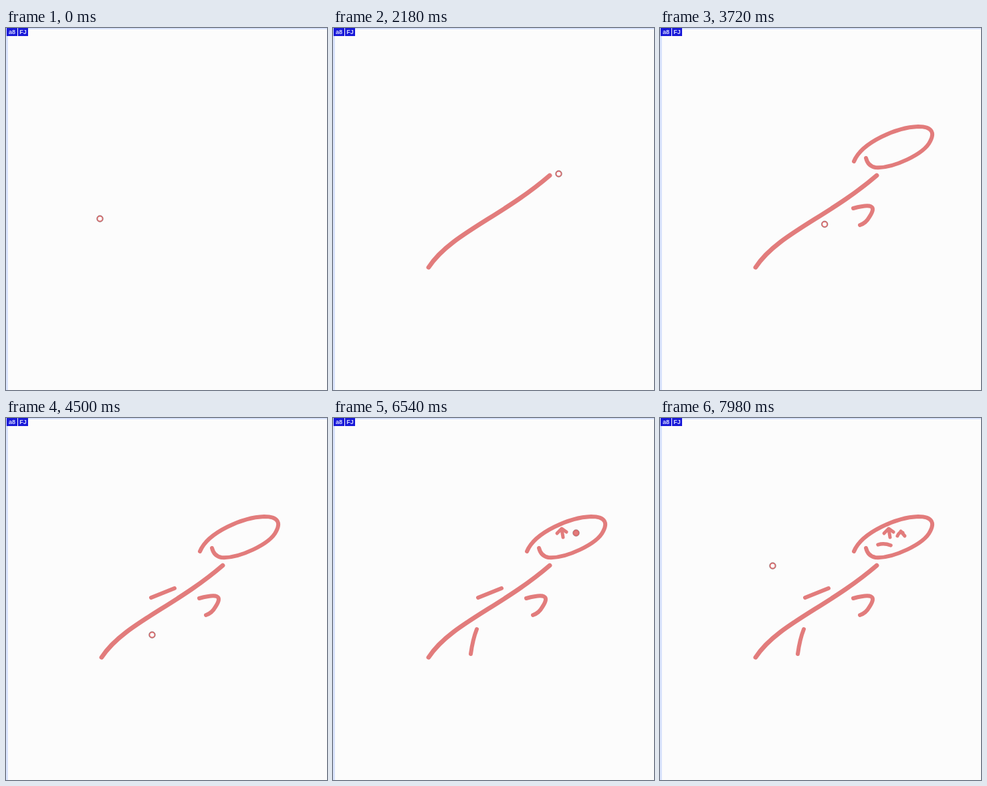
Animation, 480 px wide and 540 px high, one loop 8000 ms. Source, as an HTML page:

```html
<!DOCTYPE html>
<html lang="en">
<head>
<meta charset="utf-8">
<title>Sketching a stick figure</title>
<style>
  html, body { margin: 0; width: 100%; height: 100%; overflow: hidden; background: #fcfcfc; }
  svg { display: block; }
  .edge { fill: #d9e3fc; }
  .tab { fill: #1919d8; }
  text { font: bold 9px "Liberation Sans", Arial, sans-serif; fill: #d9ddff; text-anchor: middle; }
  #ink { fill: none; stroke: #e27c7c; stroke-linecap: round; stroke-linejoin: round; filter: blur(0.7px); }
  #pen .ring { stroke: #e06a6c; stroke-width: 1.9; }
  #pen .rim { fill: none; stroke: #5f7878; stroke-width: 0.8; stroke-opacity: 0.55; }
</style>
</head>
<body>
<svg width="480" height="540" viewBox="0 0 480 540">
  <rect class="edge" width="480" height="2"/>
  <rect class="edge" width="3" height="540"/>
  <rect class="tab" x="1" width="16" height="12"/>
  <rect class="tab" x="18" width="15" height="12"/>
  <text x="9" y="9">a8</text>
  <text x="25.5" y="9">FJ</text>
  <g id="ink"></g>
  <g id="pen">
    <circle class="ring" r="4"/>
    <circle class="rim" r="4.9"/>
  </g>
</svg>
<script>
const LOOP = 8000, STEP = 20, LAG = 40;
const ink = document.getElementById('ink');
const pen = document.getElementById('pen');
const legs = [];

function addLeg(end, d, width = 0, lag = LAG) {
  const path = document.createElementNS('http://www.w3.org/2000/svg', 'path');
  path.setAttribute('d', d);
  path.setAttribute('stroke-width', width);
  if (width) ink.append(path);
  const begin = legs.length ? legs[legs.length - 1].end : 0;
  legs.push({ begin, end, path, width, lag, length: path.getTotalLength() });
}

// A hover continues from wherever the pen was left.
function hover(end, d) {
  const last = legs[legs.length - 1];
  const p = last ? last.path.getPointAtLength(last.length) : { x: 140, y: 284 };
  addLeg(end, `M${p.x} ${p.y}${d}`);
}

hover(960, 'C95 300 130 350 190 300S262 214 228 271');
hover(1260, 'C205 300 130 345 143 357');
// body
addLeg(1750, 'M143 357C176 307 252 282 324 220', 6.8, 165);
hover(2180, 'L337 217');
hover(2480, 'C355 205 310 193 290 199');
// head
addLeg(2880, 'M290 199C302 170 355 148 386 147C409 147 410 158 404 169C395 188 348 210 322 208Q311 206 308 194', 6);
hover(3000, 'C310 205 340 215 350 231');
hover(3340, 'C355 295 300 295 289 269');
// arms
addLeg(3560, 'M289 269C315 262 325 264 313 282Q308 291 299 294', 6);
hover(3900, 'C270 305 165 275 217 268');
addLeg(4040, 'M217 268L252 254', 6);
hover(4500, 'C285 255 270 285 218 323');
hover(4540, 'L215 315');
// leg
addLeg(4680, 'M215 315Q209 330 206 352', 6);
hover(5500, 'C190 375 230 310 270 240S385 110 334 172');
hover(5700, 'L334 172');
// eyes
addLeg(5960, 'M335 172L342 165L349 170', 5);
hover(6080, 'L342 166');
addLeg(6220, 'M342 166L344 178', 5);
hover(6540, 'C350 190 375 155 363 171');
addLeg(6640, 'M363 171Q358 169 355 176', 5);
hover(6720, 'L360 169');
addLeg(6800, 'M360 169L366 176', 5);
hover(6960, 'C368 190 330 180 326 189');
// mouth
addLeg(7100, 'M326 189Q335 186 345 190', 5.5);
hover(7380, 'C365 200 340 215 355 230');
hover(7980, 'C385 300 290 320 168 220');

// Share of a leg covered at time t, with soft ends.
function covered(leg, t) {
  const u = Math.max(0, Math.min(1, (t - leg.begin) / (leg.end - leg.begin)));
  return u - Math.sin(2 * Math.PI * u) / (4 * Math.PI);
}

function draw(t) {
  for (const leg of legs) {
    if (!leg.width) continue;
    const late = t - leg.lag;
    leg.path.style.visibility = late < leg.begin ? 'hidden' : 'visible';
    leg.path.style.strokeDasharray = `${covered(leg, late) * leg.length} ${leg.length + 20}`;
  }
  const now = legs.find(leg => t < leg.end) || legs[legs.length - 1];
  const p = now.path.getPointAtLength(covered(now, t) * now.length);
  pen.setAttribute('transform', `translate(${p.x + 0.5} ${p.y + 0.5})`);
  pen.setAttribute('fill', now.width ? '#e27c7c' : 'none');
}

const start = performance.now();
function tick() {
  const t = (performance.now() - start) % LOOP;
  draw(Math.floor(t / STEP) * STEP);
  requestAnimationFrame(tick);
}
tick();
</script>
</body>
</html>
```
